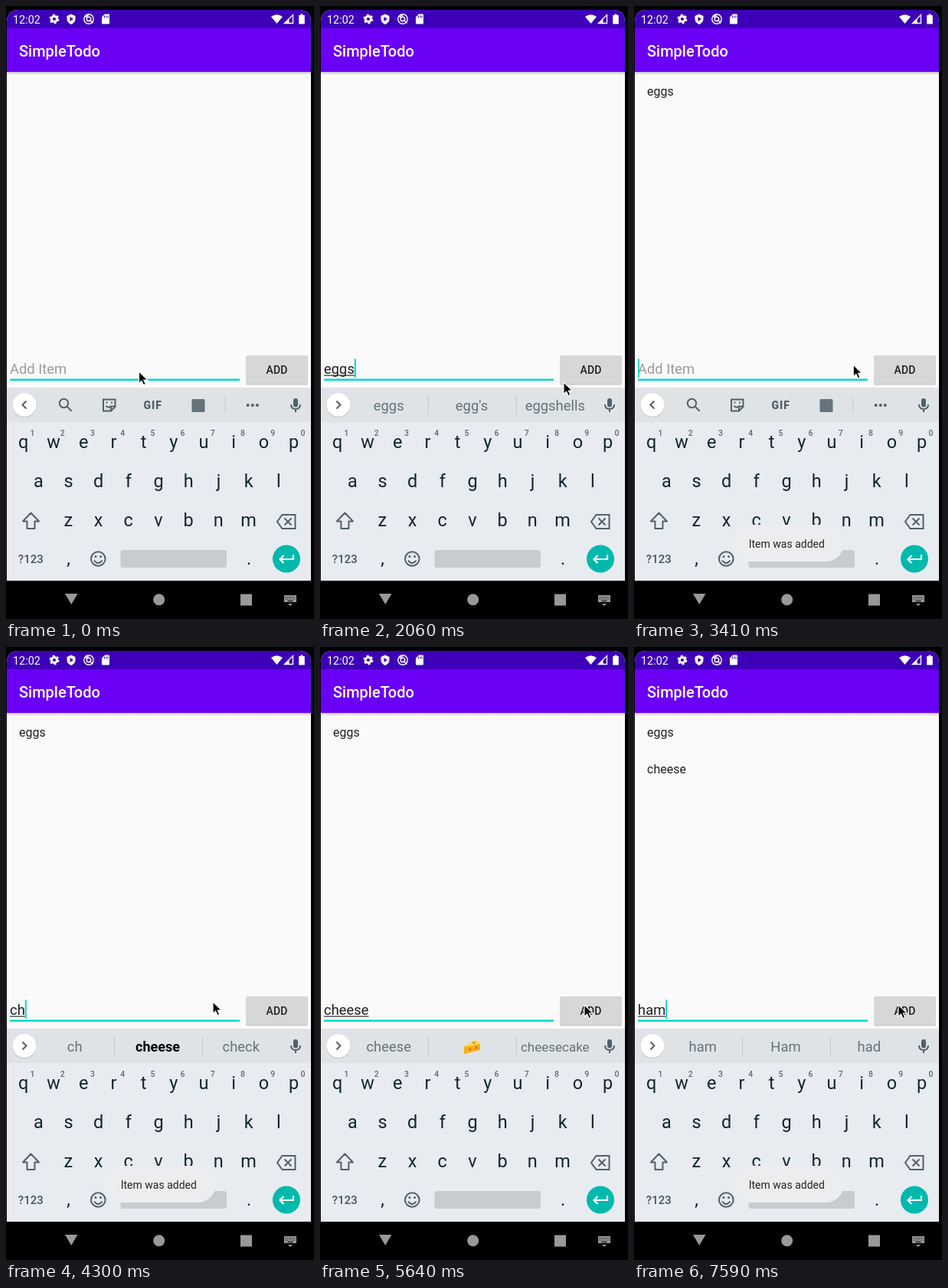
An HTML page that plays this animation: 402 by 800 pixels, repeating every 8000 ms.

```html
<!DOCTYPE html>
<html lang="en">
<head>
<meta charset="utf-8">
<title>Todo list</title>
<style>
  html, body { margin: 0; width: 100%; height: 100%; overflow: hidden; background: #000; }
  svg { display: block; width: 402px; height: 800px; font-family: Roboto, "Noto Sans", sans-serif; }
  text { white-space: pre; }
  .mid { text-anchor: middle; }
  .line { fill: none; stroke: #52616a; stroke-width: 2; }
</style>
</head>
<body>
<svg viewBox="0 0 402 800">
  <defs>
    <linearGradient id="shade" x2="0" y2="1">
      <stop stop-color="#c4c4c4"/><stop offset="1" stop-color="#fafafa"/>
    </linearGradient>
    <clipPath id="screen"><path d="M1 750V21Q1 5 17 5H382Q398 5 398 21V750Z"/></clipPath>
  </defs>
  <rect width="402" height="800"/>

  <g clip-path="url(#screen)">
    <rect x="1" y="5" width="397" height="745" fill="#fafafa"/>
    <rect x="1" y="5" width="397" height="24" fill="#3d00b8"/>
    <rect x="1" y="29" width="397" height="57" fill="#6a00f5"/>
    <rect x="1" y="86" width="397" height="4" fill="url(#shade)"/>
    <rect x="1" y="498" width="397" height="45" fill="#dfe3e6"/>
    <rect x="1" y="543" width="397" height="207" fill="#e8ecf0"/>
  </g>

  <!-- Status bar -->
  <g fill="#fff">
    <text x="9" y="22.5" font-size="14.4">12:02</text>
    <circle cx="63" cy="17" r="3.6" fill="none" stroke="#fff" stroke-width="3"/>
    <circle cx="63" cy="17" r="5.4" fill="none" stroke="#fff" stroke-width="2" stroke-dasharray="2.83 2.83"/>
    <path d="M85 10.5l5.5 2.4v4c0 3.200-2.300 5.800-5.500 7-3.200-1.200-5.500-3.800-5.500-7v-4z"/>
    <path d="M83.500 14l4.500 3-4.500 3z" fill="#3d00b8"/>
    <g fill="none" stroke="#fff" stroke-width="1.4">
      <circle cx="108" cy="17" r="6.200"/><circle cx="108" cy="17" r="2.800"/><path d="M109 18l4.500 4.500M104 15q1-2.500 4-2.500"/>
    </g>
    <path d="M129 10.500h5q1 0 1 1v11q0 1-1 1h-8q-1 0-1-1v-8z"/>
    <path d="M128.500 12.500v3M131 12.500v3M133.200 12.500v3" stroke="#3d00b8"/>
    <path d="M346 14q7.500-5.500 15 0l-7.500 9z"/>
    <path d="M363.500 22.500l11-11v11z" fill="none" stroke="#fff" stroke-width="1.300"/>
    <path d="M363 23l6.500-6.500V23z"/>
    <path d="M384.500 10.500h3v1.500h2.300v11.500h-7.600V12h2.300z"/>
    <text x="17" y="66" font-size="20" font-weight="500">SimpleTodo</text>
  </g>

  <g id="list" font-size="16" fill="#212121">
    <text x="17" y="117">eggs</text>
    <text x="17" y="165">cheese</text>
  </g>

  <!-- Entry row -->
  <text id="entry" x="5" y="480" font-size="18.4"></text>
  <rect id="underline" x="5" y="481.500" height="1.200" fill="#303030"/>
  <rect x="5" y="486.500" width="300" height="2.500" fill="#00dcc8"/>
  <rect id="caret" y="460.500" width="2" height="24.500" fill="#00dcc8"/>
  <rect x="313" y="457" width="81" height="37.500" rx="2" fill="#c9c9c9"/>
  <rect id="button" x="313" y="456" width="81" height="37" rx="2"/>
  <text class="mid" x="353.500" y="480" font-size="14" font-weight="500" letter-spacing=".2" fill="#202020">ADD</text>

  <!-- Strip above the keys -->
  <circle cx="24" cy="521.500" r="15.800" fill="#cbcfd2"/>
  <circle cx="24" cy="520.500" r="15.300" fill="#fff"/>
  <path id="chevron" class="line"/>
  <rect x="375" y="512" width="6" height="11.500" rx="3" fill="#52616a"/>
  <path class="line" stroke-width="1.700" d="M372 520q0 6 6 6t6-6M378 526v4"/>
  <g id="tools">
    <circle class="line" cx="75.500" cy="518.500" r="5.700"/>
    <path class="line" d="M79.700 522.700l6 6"/>
    <path class="line" stroke-width="1.800" d="M127 513.500h15.500v9.500l-5.500 5.500h-10zM137 528v-5.500h5.500M130.500 521.500q2.500 4 5.500 1"/>
    <path d="M130.500 516.500h2v2h-2zM137 516.500h2v2h-2z" fill="#52616a"/>
    <text x="179.500" y="525.500" font-size="14" font-weight="900" letter-spacing="1" fill="#52616a">GIF</text>
    <rect x="242.500" y="513" width="17" height="17" rx="1.500" fill="#66737b"/>
    <path d="M286 510v21" stroke="#c4c9cd"/>
    <g fill="#52616a"><circle cx="315.700" cy="521" r="2"/><circle cx="321.800" cy="521" r="2"/><circle cx="327.900" cy="521" r="2"/></g>
  </g>
  <g id="words" class="mid" font-size="18.4" fill="#65727a">
    <path d="M141.500 508v25M256.500 508v25" stroke="#c4c9cd"/>
    <text x="89.700" y="528"></text>
    <text x="198" y="528"></text>
    <text x="306.800" y="528"></text>
  </g>
  <g id="cheese">
    <path d="M188 521l14-8q6 1 7 5l-20 5z" fill="#ffd95a"/>
    <path d="M188 522l21-4v8l-21 5z" fill="#f9ae1e"/>
    <path d="M194 525a2 1.800 0 1 0 4 0a2 1.800 0 1 0-4 0M202 523a2 2 0 1 0 4 0a2 2 0 1 0-4 0M199 516.500a2 1.200 0 1 0 4 0a2 1.200 0 1 0-4 0" fill="#dd7c12"/>
  </g>

  <!-- Keyboard -->
  <g id="keys" class="mid" font-size="23.5" fill="#14252e"></g>
  <path class="line" stroke-linejoin="round" d="M32.500 661.500l10.500 11h-5.500v9.500h-10v-9.500h-5.500z"/>
  <path class="line" d="M360.500 664h17v18h-17l-6.500-9zM363.500 668.500l9 9M372.500 668.500l-9 9"/>
  <text class="mid" x="32.300" y="727" font-size="15" font-weight="500" fill="#46555e">?123</text>
  <circle class="line" cx="120.300" cy="721.500" r="9.300"/>
  <path class="line" d="M115 723.500q5.300 7 10.600 0"/>
  <circle cx="117" cy="718.500" r="1.500" fill="#52616a"/><circle cx="123.600" cy="718.500" r="1.500" fill="#52616a"/>
  <rect x="149.500" y="710" width="138.500" height="23" rx="3" fill="#c8ccd1"/>
  <circle cx="366" cy="721.500" r="18" fill="#00b9ac"/>
  <path d="M375 716v6h-17M362.500 717l-5 5 5 5" fill="none" stroke="#fff" stroke-width="2.200"/>

  <g id="toast">
    <rect x="127" y="677" width="147" height="48" rx="24" fill="#ebedee"/>
    <text class="mid" x="199.300" y="707" font-size="14" fill="#252525">Item was added</text>
  </g>

  <!-- Navigation bar -->
  <g fill="#999">
    <path d="M77 767h16.500l-8.250 14z"/>
    <circle cx="199.700" cy="774.700" r="7.500"/>
    <rect x="306" y="767.500" width="15" height="15"/>
    <path d="M363 769h16v9h-16z"/>
    <path d="M368 780h6l-3 3z"/>
    <path d="M364.500 771.500h13M364.500 774h13" stroke="#000" stroke-width="1.200" stroke-dasharray="1.200 1.200"/>
    <path d="M367.500 776.500h7" stroke="#000"/>
  </g>

  <path id="mouse" d="M0 0v15.500l3.600-3.400 2.500 5.700 2.700-1.200-2.500-5.500h5z" fill="#000" stroke="#fff" stroke-width="1.100"/>
</svg>

<script>
const LOOP = 8000;
const $ = id => document.getElementById(id);
const entry = $("entry"), words = [...$("words").querySelectorAll("text")], items = [...$("list").children];

// [time, entry text, suggestions]; no suggestions means the tool strip
const EGGS = "eggs egg's eggshells";
const EDITS = [
  [-1000, "", ""],
  [450, "e", "e eggs even"],
  [590, "eg", "eg egg eggs"],
  [740, "egg", "egg eggs Egg"],
  [1040, "eggs", EGGS],
  [2960, "", EGGS],
  [3110, "", ""],
  [4010, "c", ""],
  [4150, "c", "c can come"],
  [4300, "ch", "ch *cheese check"],
  [4450, "che", "che *cheese check"],
  [4600, "chee", "chee *cheese cheers"],
  [4890, "chees", "chees *cheese cheesy"],
  [5040, "cheese", "cheese # cheesecake"],
  [5940, "", "cheese # cheesecake"],
  [6090, "", ""],
  [6990, "h", ""],
  [7140, "h", "h have he"],
  [7440, "ha", "ha have had"],
  [7590, "ham", "ham Ham had"]
];
const CLICKS = [2960, 5940];

// [start, end, steps, x, y]
const MOVES = [
  [1190, 2060, 7, 318, 491],
  [2210, 2510, 3, 335, 484],
  [3110, 3560, 4, 270, 463],
  [4890, 5640, 6, 345, 467]
];

function buildKeys() {
  const key = (x, y, label, extra = "") => `<text x="${x}" y="${y}" ${extra}>${label}</text>`;
  const row = (letters, x, y) => [...letters].map((c, i) => key(x + i * 39.2, y, c)).join("");
  const digits = [..."1234567890"].map((d, i) =>
    key(34.600 + i * 39.2, 560.500, d, 'font-size="10.5" font-weight="500" fill="#5c6a72"')).join("");
  $("keys").innerHTML = row("qwertyuiop", 22.800, 577) + digits + row("asdfghjkl", 42.300, 628) +
    row("zxcvbnm", 81.300, 679) + key(81.500, 729, ",") + key(317, 729, ".");
}

function mouseAt(t) {
  let x = 173.500, y = 477;
  for (const [start, end, steps, toX, toY] of MOVES) {
    if (t < start) break;
    const step = Math.floor((t - start) / (end - start) * (steps - 1)) + 1;
    const p = Math.min(1, step / steps);
    x += (toX - x) * p;
    y += (toY - y) * p;
  }
  return [x, y];
}

function toastAlpha(t) {
  const alpha = click => {
    const age = t - click;
    if (age < 300 || age >= 2530) return 0;
    return age < 450 || age >= 2380 ? 0.5 : 1;
  };
  return Math.max(...CLICKS.map(alpha));
}

const show = (el, on) => el.setAttribute("visibility", on ? "visible" : "hidden");

function drawEntry(t, text, cleared) {
  entry.textContent = text || "Add Item";
  entry.setAttribute("fill", text ? "#212121" : "#9b9b9b");
  const width = text ? entry.getComputedTextLength() : 0;
  $("underline").setAttribute("width", width);
  $("caret").setAttribute("x", 5 + width);
  const age = t - cleared;
  show($("caret"), text ? age % 1020 < 450 : age < 600);
}

function drawStrip(suggestions) {
  const parts = suggestions.split(" ");
  show($("tools"), !suggestions);
  show($("words"), suggestions);
  show($("cheese"), parts[1] === "#");
  $("chevron").setAttribute("d", suggestions ? "M21.500 515.500l5 5-5 5" : "M26.500 515.500l-5 5 5 5");
  words.forEach((el, i) => {
    const word = parts[i] || "", bold = word[0] === "*";
    el.textContent = word.replace(/[*#]/, "");
    el.setAttribute("font-weight", bold ? 700 : 400);
    el.setAttribute("fill", bold ? "#000" : "#65727a");
    el.setAttribute("font-size", word.length > 9 ? 17 : bold ? 18 : 18.4);
  });
}

function render(t) {
  const [time, text, suggestions] = EDITS.findLast(edit => edit[0] <= t);
  const since = text ? time : EDITS.findLast((edit, i) =>
    edit[0] <= t && !edit[1] && (!i || EDITS[i - 1][1]))[0];
  drawEntry(t, text, since);
  drawStrip(suggestions);
  items.forEach((el, i) => show(el, t >= CLICKS[i] + 150));
  const pressed = CLICKS.some(c => t >= c && t < c + 300);
  $("button").setAttribute("fill", pressed ? "#b9baba" : "#d6d7d7");
  $("toast").setAttribute("opacity", toastAlpha(t));
  $("mouse").setAttribute("transform", `translate(${mouseAt(t)})`);
}

buildKeys();
const begin = performance.now();
function tick() {
  render((performance.now() - begin) % LOOP);
  requestAnimationFrame(tick);
}
tick();
</script>
</body>
</html>
```
